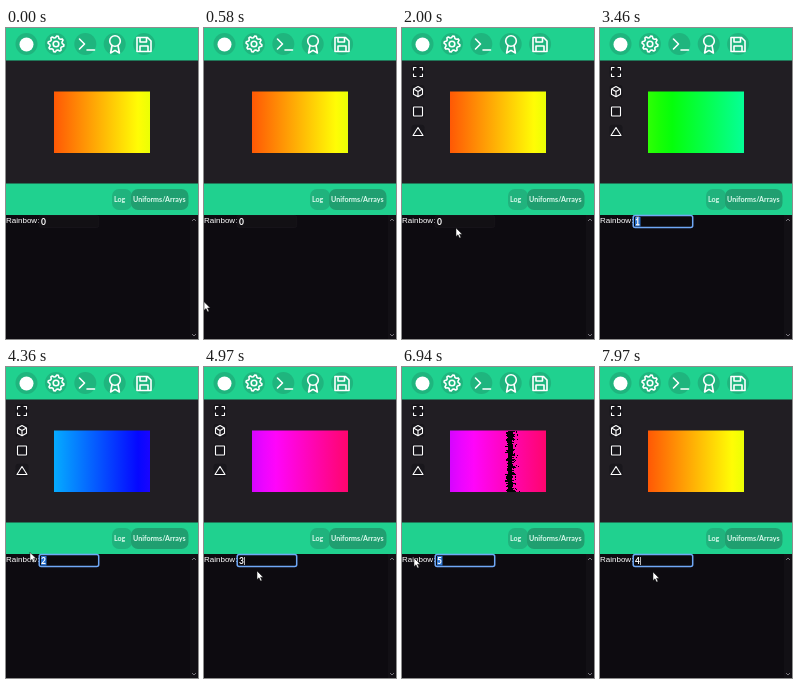
Animation, 192 px wide and 311 px high, one loop 8 s. Source, as an HTML page:

```html
<!DOCTYPE html>
<html lang="en">
<head>
<meta charset="utf-8">
<title>Rainbow uniform</title>
<style>
html, body { margin: 0; width: 100%; height: 100%; overflow: hidden; background: #0d0b10; }
svg { display: block; width: 192px; height: 311px; }
.ui { font: bold 7.1px Lato, "Open Sans", sans-serif; fill: #dcfbee; }
.label { font: 8px "Liberation Sans", Arial, sans-serif; fill: #fff; }
.digit { font: bold 8.5px Lato, "Open Sans", sans-serif; fill: #fff; }
.line { fill: none; stroke: #fff; stroke-width: 1.6; stroke-linecap: round; stroke-linejoin: round; }
.thin { stroke-width: 1.1; }
</style>
</head>
<body>
<svg viewBox="0 0 192 311">
  <defs><linearGradient id="ramp"></linearGradient></defs>
  <rect width="192" height="311" fill="#0d0b10"/>
  <rect width="192" height="187" fill="#20d18f"/>
  <rect y="32.5" width="192" height="123" fill="#211e23"/>

  <g id="discs" fill="#1fb57e"></g>
  <circle cx="20.5" cy="16.5" r="7" fill="#fff"/>
  <g class="line">
    <path id="gear"/>
    <circle cx="50" cy="16" r="2.8"/>
    <path d="M73.5 11l5 5-5 5M81 22h7.5"/>
    <circle cx="109" cy="13" r="5.3"/>
    <path d="M106 17.5l-1.4 7.5 4.4-2.600 4.400 2.600-1.400-7.500"/>
    <path d="M131 9.500h10.500l3.500 3.500v10.500h-14zM134 9.500v4.500h6.500v-4.500M134 23.500v-5.500h8v5.500"/>
  </g>

  <g id="tools">
    <g id="tiles" fill="#19171c"></g>
    <g class="line thin">
      <path d="M11.500 42v-2.500h2.500M18 39.500h2.500v2.500M20.500 46v2.500h-2.500M14 48.500h-2.500v-2.500"/>
      <path d="M16 58.500l4.500 2.500v5.200l-4.500 2.500-4.500-2.500v-5.200zM11.500 61l4.500 2.500 4.500-2.500M16 63.500v5"/>
      <rect x="11.500" y="79" width="9" height="9" rx=".5"/>
      <path d="M16 99.500l5 8h-10z"/>
    </g>
  </g>

  <rect x="48" y="63.500" width="96" height="61.500" fill="url(#ramp)"/>
  <path id="strip" stroke="#050005"/>

  <rect x="106" y="161" width="20" height="21" rx="7" fill="#20b37d"/>
  <rect x="125" y="161" width="57.500" height="21" rx="7" fill="#209f70"/>
  <text class="ui" x="108" y="174">Log</text>
  <text class="ui" x="127" y="174">Uniforms/Arrays</text>

  <rect x="184" y="187" width="8" height="124" fill="#121015"/>
  <path d="M186 193l2-2 2 2M186 306l2 2 2-2" fill="none" stroke="#77747b"/>

  <text class="label" x="0" y="195">Rainbow:</text>
  <rect id="field" x="33.200" y="187.500" width="59.500" height="12" rx="2"/>
  <rect id="mark" x="35" y="189" width="5.500" height="9.500" fill="#2b73cf"/>
  <text id="digit" class="digit" x="35" y="197"></text>
  <path id="caret" d="M40.500 190v8" stroke="#fff" stroke-width=".7"/>

  <path id="arrow" d="M0 0v8.600l2-1.800 1.500 3.300 1.500-.7-1.500-3.200h2.700z" fill="#fff" stroke="#111" stroke-width=".5"/>
  <path id="beam" d="M-1.500-4h3M0-4v8M-1.500 4h3" fill="none" stroke="#ddd" stroke-width=".8"/>
</svg>
<script>
const LOOP = 8000;
const $ = id => document.getElementById(id);
const show = (id, on) => $(id).setAttribute("visibility", on ? "visible" : "hidden");
const easeOut = u => 1 - (1 - u) ** 3;

// Each edit drags left to "drag", types a digit, then moves to "rest".
const edits = [
  { from: 2490, to: 3150, drag: [29, 193], rest: [42, 194], digit: 1, turn: 1 },
  { from: 3360, to: 4060, drag: [37, 193], rest: [42, 194], digit: 2, turn: 2 },
  { from: 4270, to: 5030, drag: [19, 183], rest: [53, 204], digit: 3, turn: 3 },
  { from: 5360, to: 5910, drag: [13, 191], rest: [62, 218], digit: 5, turn: 3 },
  { from: 6640, to: 7420, drag: [12, 191], rest: [45, 195], digit: 4, turn: 4 },
  { from: 7640, to: 7970, drag: [12, 191], rest: [53, 205], digit: 4, turn: 4 }
];
const within = (e, u) => e.from + (e.to - e.from) * u;
const typedAt = e => within(e, 0.45);

const moves = [
  { from: 580, to: 1330, at: [9, 212] },
  { from: 1390, to: 2000, at: [54, 200] },
  { from: 6240, to: 6490, at: [72, 196] },
  ...edits.flatMap(e => [
    { from: e.from, to: within(e, 0.3), at: e.drag },
    { from: typedAt(e), to: within(e, 0.8), at: e.rest }
  ])
].sort((a, b) => a.from - b.from);

function pointerAt(t) {
  let p = [0, 274];
  for (const m of moves) {
    if (t < m.from) break;
    const k = easeOut(Math.min(1, (t - m.from) / (m.to - m.from)));
    p = p.map((v, i) => v + (m.at[i] - v) * k);
  }
  return p;
}

function gearPath(x, y) {
  const points = [];
  for (let i = 0; i < 32; i++) {
    const a = (i - 1.5) * Math.PI / 16;
    const r = i % 4 < 2 ? 6.2 : 8;
    points.push([x + r * Math.sin(a), y - r * Math.cos(a)]);
  }
  return "M" + points.join("L") + "Z";
}

// A dark band with ragged edges and a few loose specks.
function stripPath() {
  let seed = 7, d = "";
  const random = () => (seed = seed * 16807 % 2147483647) / 2147483647;
  for (let y = 64; y < 125; y++) {
    const left = Math.round(106 - 3 * random() ** 2);
    const right = Math.round(110 + 4 * random() ** 2);
    d += `M${left} ${y + 0.5}H${right}`;
    if (random() < 0.4) d += `m${1 + Math.floor(3 * random())} 0h1`;
  }
  return d;
}

// Every turn shifts the hues by a quarter of the wheel.
let shownTurn = -1;
function setRamp(turn) {
  if (turn === shownTurn) return;
  shownTurn = turn;
  let stops = "";
  for (let k = 0; k <= 1; k += 0.125) {
    stops += `<stop offset="${k}" stop-color="hsl(${20 + 90 * turn + 45 * k},100%,51%)"/>`;
  }
  $("ramp").innerHTML = stops;
}

function draw(t) {
  const last = edits.filter(e => t >= typedAt(e)).pop() || { digit: 0, turn: 0 };
  const picked = edits.some(e => t >= within(e, 0.1) && t < typedAt(e));
  const focus = t >= within(edits[0], 0.1);
  setRamp(last.turn);
  $("digit").textContent = last.digit;
  $("field").setAttribute("fill", focus ? "#0b0a0e" : "#121014");
  $("field").setAttribute("stroke", focus ? "#6fa8f6" : "#1c191f");
  $("field").setAttribute("stroke-width", focus ? 1.5 : 0.6);
  show("strip", last.digit === 5);
  show("tools", t >= 1520);
  show("mark", picked);
  show("caret", focus && !picked);

  const [x, y] = pointerAt(t);
  const inField = x > 33 && x < 93 && y > 188 && y < 199;
  show("arrow", t >= moves[0].from && !inField);
  show("beam", inField);
  $(inField ? "beam" : "arrow").setAttribute("transform", `translate(${x} ${y})`);
}

$("gear").setAttribute("d", gearPath(50, 16));
$("strip").setAttribute("d", stripPath());
for (let i = 0; i < 5; i++) {
  $("discs").innerHTML += `<circle cx="${20.5 + 29.4 * i}" cy="16" r="11"/>`;
}
for (let i = 0; i < 4; i++) {
  $("tiles").innerHTML += `<rect x="9.5" y="${37.3 + 19.8 * i}" width="13" height="13" rx="3"/>`;
}

const start = performance.now();
function tick() {
  draw((performance.now() - start) % LOOP);
  requestAnimationFrame(tick);
}
tick();
</script>
</body>
</html>
```
